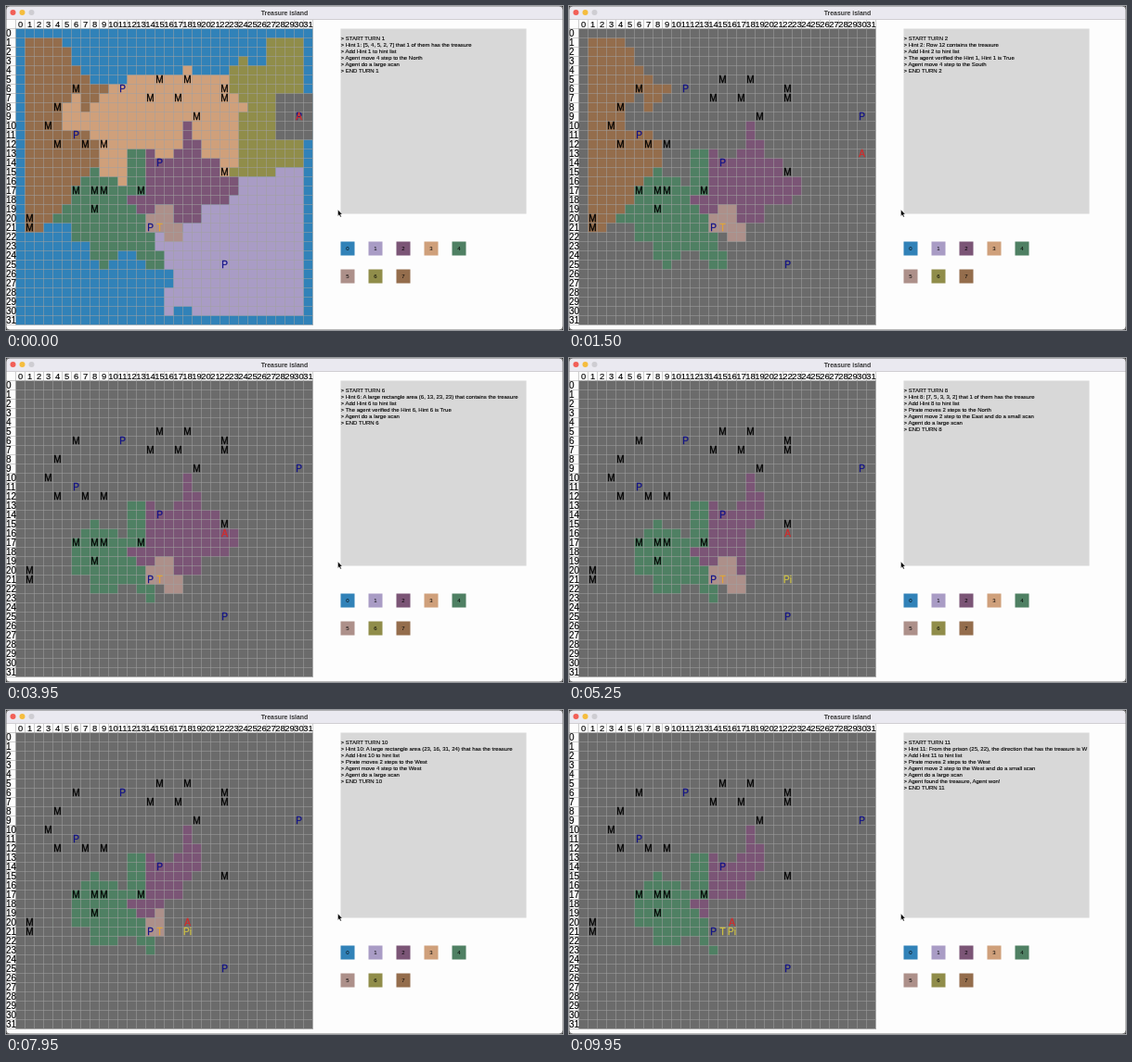
Recreate the animation shown at these times as an HTML page. Size 600 by 350 pixels, loop 10000 ms.

```html
<!DOCTYPE html>
<html lang="en">
<head>
<meta charset="utf-8">
<title>Treasure island</title>
<style>
  html, body { margin: 0; width: 100%; height: 100%; overflow: hidden; background: #fdfdfd; }
  svg { display: block; width: 600px; height: 350px; }
  text { font-family: "Liberation Sans", Arial, sans-serif; white-space: pre; }
  .title { font-size: 6.9px; font-weight: 700; fill: #333; text-anchor: middle; }
  .mark, .head, .key { text-anchor: middle; }
  .mark, .side { font-size: 10px; }
  .mark { stroke-width: .3; }
  .head { font-size: 9.4px; }
  .head, .side { stroke: #000; stroke-width: .15; }
  .key { font-size: 6px; fill: #000; }
  .log { font-size: 6px; fill: #000; stroke: #000; stroke-width: .12; }
  .lines { fill: none; stroke: #a2a2a2; stroke-opacity: .52; }
</style>
</head>
<body>
<svg viewBox="0 0 600 350">
  <defs><clipPath id="panel"><rect x="360.5" y="24.5" width="200" height="200"/></clipPath></defs>
  <rect width="600" height="350" fill="#fdfdfd"/>
  <rect width="600" height="14" fill="#eae9f0"/>
  <rect y="14" width="600" height="1" fill="#d0ced2"/>
  <circle cx="7.5" cy="7" r="3" fill="#f25f57"/>
  <circle cx="17.5" cy="7" r="3" fill="#f5bd3e"/>
  <circle cx="27.5" cy="7" r="3" fill="#cecdd2"/>
  <text class="title" x="300" y="9.5">Treasure island</text>
  <g id="board" transform="translate(10.5 24.5) scale(10)"></g>
  <path id="lines" class="lines"/>
  <g id="marks"></g>
  <rect x="360.5" y="24.5" width="200" height="200" fill="#d8d8d8"/>
  <g id="log" clip-path="url(#panel)"></g>
  <g id="keys"></g>
  <path d="M357.5 220v7l1.5-1.4 1.1 2.4 1.2-.5-1.1-2.4h2z" fill="#000" stroke="#fff" stroke-width=".4"/>
  <path d="M0 0h4Q0 0 0 4zM600 0h-4q4 0 4 4zM0 350v-4q0 4 4 4zM600 350v-4q0 4-4 4z" fill="#333"/>
  <rect width="600" height="350" rx="4" fill="none" stroke="#777"/>
</svg>
<script>
const LOOP = 10000;
const SIZE = 32, CELL = 10, LEFT = 10.5, TOP = 24.5;
const GRAY = '#6b6b6b';
const COLORS = ['#3182b8', '#a99cc5', '#7b5576', '#cfa07b', '#4f8063', '#ad908a', '#908d4a', '#946d4c'];

// start time of each turn
const STARTS = [0, 950, 1800, 2500, 3250, 3850, 4450, 5000, 6000, 7550, 8800];

const $ = id => document.getElementById(id);

function add(parent, tag, attrs, content) {
  const el = document.createElementNS('http://www.w3.org/2000/svg', tag);
  for (const name in attrs) el.setAttribute(name, attrs[name]);
  if (content !== undefined) el.textContent = content;
  return parent.appendChild(el);
}

const cx = col => LEFT + CELL * col + CELL / 2;
const cy = row => TOP + CELL * row + CELL / 2;

// map layers in grid units: colour, outline, first turn, last turn
const LAYERS = [
  [COLORS[0], 'M0 0H32V32H0Z', 1, 1],
  [COLORS[3], 'M5 8H6V7H10V6H12V5H18V4H19V5H25V16H12V17H9V15H5Z', 1, 1],
  [COLORS[6], 'M27 1H31V15H28V16H23V15H24V9H25V8H24V7H23V4H24V3H25V4H27Z', 1, 1],
  [COLORS[1], 'M28 15H31V31H19V30H17V31H16V28H17V26H16V24H15V22H18V21H20V19H23V18H24V16H28Z', 1, 1],
  [GRAY, 'M28 7H32V12H28Z', 1, 1],
  [GRAY, 'M0 0H32V32H0Z', 2, 11],
  [COLORS[7], 'M1 1H5V2H6V4H7V5H8V6H10V7H9V8H8V9H7V7H6V8H5V11H8V12H9V15H8V16H7V17H6V19H5V20H4V21H3V22H1Z', 1, 3],
  [COLORS[4], 'M12 13H14V18H12V19H13V20H14V22H15V24H16V26H14V25H13V24H11V25H10V26H9V25H8V23H6V21H4V20H5V19H6V17H7V16H8V15H9V16H11V17H12Z', 1, 11],
  [COLORS[2], 'M18 10H19V12H20V14H22V16H24V18H23V19H20V21H17V19H15V20H13V19H12V18H14V13H15V14H17V13H18Z', 1, 11],
  [COLORS[5], 'M15 19H17V21H18V23H16V22H14V20H15Z', 1, 11],
  [GRAY, 'M4 17H6V21H8V23H11V22H13V23H14V24H17V27H4Z', 6, 11],
  [GRAY, 'M19 15H22V18H19Z', 7, 11],
  [GRAY, 'M20 14H25V19H24V21H18V16H19V15H20Z', 8, 11],
  [GRAY, 'M16 18H21V23H16Z', 10, 11],
  [GRAY, 'M14 18H19V23H14Z', 11, 11]
];

const MOUNTAINS = '15,5 18,5 6,6 22,6 14,7 17,7 22,7 4,8 19,9 3,10 4,12 7,12 9,12 22,15 6,17 8,17 9,17 13,17 8,19 1,20 1,21';
const PRISONS = '11,6 30,9 6,11 15,14 14,21 22,25';

const AGENT = '30,9 30,13 26,13 22,13 22,16 22,16 20,16 22,16 22,20 18,20 16,20'.split(' ');
const PIRATE = { 7: '22,23', 8: '22,21', 9: '20,21', 10: '18,21', 11: '16,21' };

const move = (n, way, scan = '') => `Agent move ${n} step to the ${way}${scan && ' and do a small scan'}`;
const pirate = way => `Pirate moves 2 steps to the ${way}`;
const verified = (n, truth) => `The agent verified the Hint ${n}, Hint ${n} is ${truth}`;
const LARGE = 'Agent do a large scan';

// hint followed by the actions of each turn
const TURNS = [
  ['[5, 4, 5, 2, 7] that 1 of them has the treasure', move(4, 'North'), LARGE],
  ['Row 12 contains the treasure', verified(1, 'True'), move(4, 'South')],
  ['The treasure is somewhere in a boundary of 2 regions', verified(2, 'False'), move(4, 'West')],
  ['[1, 7] that 1 of them has the treasure', verified(4, 'False'), move(4, 'West')],
  ['Column 9 contains the treasure', move(3, 'South'), LARGE],
  ['A large rectangle area (6, 13, 23, 23) that contains the treasure', verified(6, 'True'), LARGE],
  ['Row 27 contains the treasure', pirate('North'), move(2, 'West', 'small'), LARGE],
  ['[7, 5, 3, 3, 2] that 1 of them has the treasure', pirate('North'), move(2, 'East', 'small'), LARGE],
  ['Column 28 contains the treasure', pirate('West'), move(4, 'South'), LARGE],
  ['A large rectangle area (23, 16, 31, 24) that has the treasure', pirate('West'), move(4, 'West'), LARGE],
  ['From the prison (25, 22), the direction that has the treasure is W', pirate('West'),
    move(2, 'West', 'small'), LARGE, 'Agent found the treasure, Agent won!']
];

function place(el, spot) {
  const [col, row] = spot.split(',');
  el.setAttribute('x', cx(+col));
  el.setAttribute('y', cy(+row) + 3.6);
}

function paint(el, color) {
  el.setAttribute('fill', color);
  el.setAttribute('stroke', color);
}

function mark(letter, color, spot) {
  const el = add($('marks'), 'text', { class: 'mark' }, letter);
  paint(el, color);
  if (spot) place(el, spot);
  return el;
}

const layers = LAYERS.map(([fill, d, from, to]) =>
  ({ el: add($('board'), 'path', { fill, d }), from, to }));

let grid = '';
for (let i = 0; i <= SIZE; i++) {
  const x = LEFT + CELL * i, y = TOP + CELL * i;
  grid += `M${x} 15V345M0 ${y}H331`;
  if (i === SIZE) break;
  add($('marks'), 'text', { class: 'head', x: cx(i), y: 23.2 }, i);
  add($('marks'), 'text', { class: 'side', x: 0, y: cy(i) + 3.8 }, i);
}
$('lines').setAttribute('d', grid);

MOUNTAINS.split(' ').forEach(spot => mark('M', '#000', spot));
PRISONS.split(' ').forEach(spot => mark('P', '#101088', spot));
const treasure = mark('T', '#e2a436', '15,21');
const pirateMark = mark('Pi', '#cfc345');
const agentMark = mark('A', '#d02c2c');

COLORS.forEach((fill, i) => {
  const x = 360.5 + 30 * (i % 5), y = 254.5 + 30 * Math.floor(i / 5);
  add($('keys'), 'rect', { x, y, width: 15, height: 15, fill });
  add($('keys'), 'text', { class: 'key', x: x + 7.5, y: y + 9.8 }, i);
});

function show(turn) {
  for (const { el, from, to } of layers)
    el.style.display = turn >= from && turn <= to ? '' : 'none';

  place(agentMark, AGENT[turn - 1]);
  const spot = PIRATE[turn];
  pirateMark.style.display = spot ? '' : 'none';
  if (spot) place(pirateMark, spot);
  paint(treasure, turn === 11 ? '#d6c83e' : '#e2a436');

  const [hint, ...actions] = TURNS[turn - 1];
  const lines = [`START TURN ${turn}`, `Hint ${turn}: ${hint}`, `Add Hint ${turn} to hint list`,
    ...actions, `END TURN ${turn}`];
  $('log').replaceChildren();
  lines.forEach((line, i) =>
    add($('log'), 'text', { class: 'log', x: 360.6, y: 36.8 + 7.05 * i }, '> ' + line));
}

let current = 0;
function tick() {
  const t = performance.now() % LOOP;
  const turn = STARTS.filter(start => start <= t).length;
  if (turn !== current) show(current = turn);
  requestAnimationFrame(tick);
}
tick();
</script>
</body>
</html>
```
